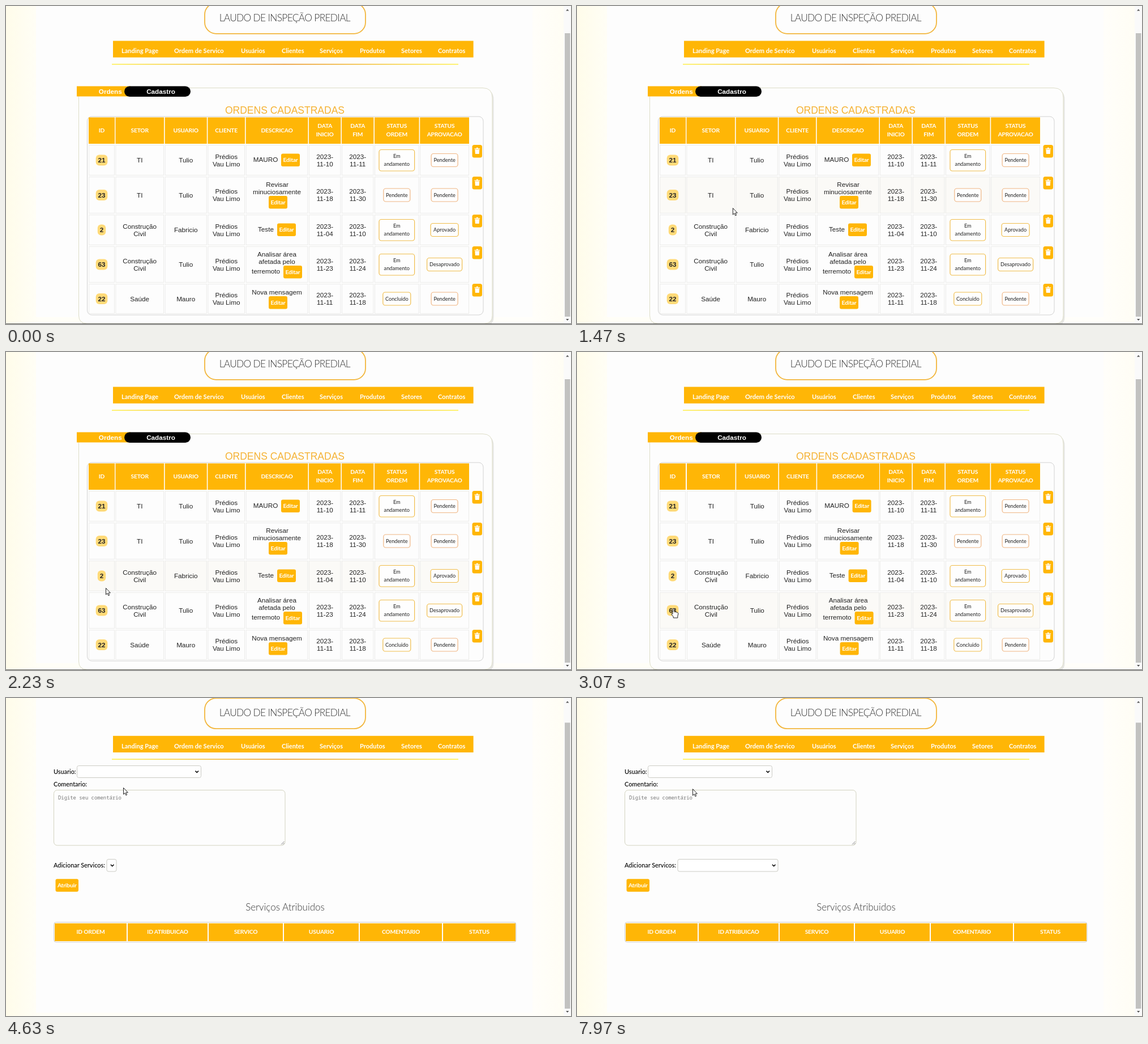
Recreate the animation shown at these times as an HTML page. Size 998 px wide and 561 px high, loop 8 s.

```html
<!DOCTYPE html>
<html lang="pt-BR">
<head>
<meta charset="utf-8">
<title>Laudo de Inspeção Predial</title>
<style>
  html, body { margin: 0; width: 100%; height: 100%; overflow: hidden; background: #fefdf6; }
  svg { display: block; width: 100vw; height: 100vh; }
  text { font: 11.7px "Liberation Sans", Arial, sans-serif; fill: #222; text-anchor: middle; }
  .start { text-anchor: start; }
  .bold { font-weight: 700; }
  .white { fill: #fff; }
  .heading { font-size: 17.5px; fill: #f5b233; }
  .thin { font: 300 17px Lato, sans-serif; fill: #333; }
  .logo { font-size: 17.3px; letter-spacing: -.65px; }
  .nav { font: 700 11px Lato, sans-serif; fill: #fff; }
  .th { font: 700 10.3px Lato, sans-serif; letter-spacing: -.2px; fill: #fff; }
  .status { font: 9.2px Lato, sans-serif; }
  .label { font: 500 10.9px Lato, sans-serif; fill: #000; }
  .hint { font: 8.9px "Noto Sans Mono", monospace; fill: #777; }
</style>
</head>
<body>
<svg viewBox="0 0 998 561" preserveAspectRatio="none">
  <defs>
    <linearGradient id="side">
      <stop offset="0" stop-color="#fffcea"/><stop offset=".06" stop-color="#fffef7"/>
      <stop offset=".93" stop-color="#fffefa"/><stop offset="1" stop-color="#fffdf3"/>
    </linearGradient>
    <linearGradient id="rule">
      <stop offset="0" stop-color="#fff04a"/><stop offset=".5" stop-color="#e8901c"/>
      <stop offset="1" stop-color="#fff04a"/>
    </linearGradient>
  </defs>
  <rect width="998" height="561" fill="url(#side)"/>
  <rect id="page" x="53" width="877" height="549" fill="#fdfdfd"/>
  <g id="orders"></g>
  <g id="detail"></g>
  <g id="header"></g>
  <g id="scrollbar"></g>
  <g id="arrow" fill="#fff" stroke="#222" stroke-width="1">
    <path d="M.5 .5V12L3.1 9.6 4.9 13.7 6.7 12.9 4.9 8.9H8.4Z"/>
  </g>
  <g id="hand" fill="#fff" stroke="#222" stroke-width="1">
    <path d="M-1 0Q.2-1.3 1.4 0V5.2L3.4 5.5 5.6 6 7.8 6.7Q9 7.1 8.8 9L7.8 13V16H.2V14L-3 9.8Q-3.8 8.2-2.4 8L-1 9.2Z"/>
  </g>
  <path id="beam" d="M-3-7.5H-1L0-6.5 1-7.5H3M0-6.5V6.5M-3 7.5H-1L0 6.5 1 7.5H3" fill="none" stroke="#444"/>
</svg>
<script>
const GOLD = '#ffb606', LOOP = 8000, SWITCH = 4030, SERVICES = 7700;
const $ = id => document.getElementById(id);
const text = (s, x, y, cls = '') => `<text x="${x}" y="${y}" class="${cls}">${s}</text>`;
const box = (x1, y1, x2, y2, fill, r = 0, stroke = 'none', w = 1) =>
  `<rect x="${x1}" y="${y1}" width="${x2 - x1}" height="${y2 - y1}" rx="${r}" fill="${fill}" stroke="${stroke}" stroke-width="${w}"/>`;
const lines = (s, x, y, gap, cls) => {
  const parts = s.split('|');
  return parts.map((p, i) => text(p, x, y + (i - (parts.length - 1) / 2) * gap, cls)).join('');
};
const button = (label, x, y, w = 33) =>
  box(x, y, x + w, y + 22.5, GOLD, 3) + text(label, x + w / 2, y + 14.5, 'th');
const chevron = (x, y) =>
  `<path d="M${x - 2.8} ${y - 1.4}l2.8 2.8 2.8-2.8" fill="none" stroke="#111" stroke-width="1.5"/>`;
const select = (x1, y1, x2, y2) =>
  box(x1, y1, x2, y2, '#fff', 3, '#cbcbc4') + chevron(x2 - 7.3, (y1 + y2) / 2);

function drawHeader() {
  const nav = [['Landing Page', 204], ['Ordem de Servico', 297], ['Usuários', 415], ['Clientes', 487],
    ['Serviços', 554], ['Produtos', 625], ['Setores', 698], ['Contratos', 763]];
  $('header').innerHTML =
    box(351, -5, 635, 48.8, '#fdfdfd', 20, '#f2b63c', 1.8) +
    text('LAUDO DE INSPEÇÃO PREDIAL', 492.3, 26.8, 'thin logo') +
    box(189, 61.5, 825.6, 90.7, GOLD) +
    nav.map(([s, x]) => text(s, x, 83.3, 'nav start')).join('') +
    box(187, 102, 799, 103.5, 'url(#rule)');
}

const columns = [[146, 192, 'ID'], [193.4, 279, 'SETOR'], [280.6, 354.8, 'USUARIO'], [356.4, 422, 'CLIENTE'],
  [423.6, 533.4, 'DESCRICAO'], [535, 591.4, 'DATA|INICIO'], [593, 649.4, 'DATA|FIM'],
  [651, 729.6, 'STATUS|ORDEM'], [731.2, 818, 'STATUS|APROVACAO']];
const rowTops = [245, 301, 368, 424, 490, 545];
const client = 'Prédios|Vau Limo';
const rows = [
  ['21', 'TI', 'Tulio', client, '2023-|11-10', '2023-|11-11', 'Em|andamento', 'Pendente'],
  ['23', 'TI', 'Tulio', client, '2023-|11-18', '2023-|11-30', 'Pendente', 'Pendente'],
  ['2', 'Construção|Civil', 'Fabricio', client, '2023-|11-04', '2023-|11-10', 'Em|andamento', 'Aprovado'],
  ['63', 'Construção|Civil', 'Tulio', client, '2023-|11-23', '2023-|11-24', 'Em|andamento', 'Desaprovado'],
  ['22', 'Saúde', 'Mauro', client, '2023-|11-11', '2023-|11-18', 'Concluido', 'Pendente']
];
// Text pieces [label, centre, baseline], then the button corner
const notes = [
  [[['MAURO', 458.5, 274.5]], 486, 260.5],
  [[['Revisar', 479, 319], ['minuciosamente', 478.5, 332]], 464, 335],
  [[['Teste', 459, 397.5]], 479, 383.5],
  [[['Analisar área', 478.5, 442], ['afetada pelo', 478.5, 455], ['terremoto', 459, 472]], 490, 458],
  [[['Nova mensagem', 478.5, 509]], 464, 512]
];
const statusHalf = { Pendente: 23.5, Aprovado: 24.5, Desaprovado: 31, Concluido: 24.5, 'Em|andamento': 31.3 };

function status(s, x, y) {
  const tall = s.includes('|'), up = tall ? 18.5 : 11.5, w = statusHalf[s];
  const edge = s === 'Pendente' ? '#efb684' : '#f0bd4c';
  return box(x - w, y - up, x + w, y + (tall ? 19 : 11.5), '#fefefe', 4, edge, 1.2) +
    lines(s, x, y + 3.2, 14.5, 'status');
}

function trash(y) {
  return box(823.5, y, 841, y + 22.5, GOLD, 3.5) +
    `<path d="M827.5 ${y + 6.2}h3l.8-1.4h2l.8 1.4h3v1.3h-9.6zM828.3 ${y + 8.3}h8l-.6 7.7h-6.8z" fill="#fff"/>`;
}

function drawOrders() {
  const groups = ['', '', ''];
  const put = (col, s) => groups[col === 0 ? 0 : col < 5 ? 1 : 2] += s;
  columns.forEach(([x1, x2, title], c) => {
    const x = (x1 + x2) / 2;
    put(c, box(x1, 196.5, x2, 243, GOLD) + lines(title, x, 222.6, 15, 'th'));
    rows.forEach((row, r) => {
      const top = rowTops[r], y = (top + rowTops[r + 1] - 2) / 2;
      put(c, box(x1 + .5, top + .5, x2 - .5, rowTops[r + 1] - 2.5, 'none', 0, '#ececea'));
      if (c === 0) {
        const w = row[0].length > 1 ? 10.3 : 7.2;
        put(c, box(x - w, y - 9.5, x + w, y + 9.5, '#ffda78', 6) + text(row[0], x, y + 4.2, 'bold'));
      } else if (c === 4) {
        const [words, bx, by] = notes[r];
        put(c, words.map(w => text(...w)).join('') + button('Editar', bx, by));
      } else {
        const s = row[c < 4 ? c : c - 1];
        put(c, c > 6 ? status(s, x, y) : lines(s, x, y + 4.2, 13.4));
      }
    });
  });
  const panel = 'M128.5 144.5H842Q859 144.5 859 162V546Q859 560 845 560H143Q128.5 560 128.5 546Z';
  $('orders').innerHTML =
    `<path d="${panel}" fill="#e6e6e3" transform="translate(2.5 3)"/>` +
    `<path d="${panel}" fill="#fdfdfd" stroke="#dedec8"/>` +
    box(125, 141.5, 220, 159.5, GOLD) + box(209, 141.5, 326, 160, '#000', 9.2) +
    text('Ordens', 184.3, 155, 'bold white') + text('Cadastro', 273.5, 155, 'bold white') +
    text('ORDENS CADASTRADAS', 492.5, 190, 'heading') +
    box(143.5, 195, 843, 545, 'none', 8, '#d2d2d2') +
    '<rect id="hover" x="146" width="672" fill="#fbfaf7"/>' +
    `<g>${groups[0]}</g><g id="shift">${groups[1]}</g><g>${groups[2]}</g>` +
    rowTops.slice(0, 5).map(trash).join('') +
    box(0, 560, 998, 561, '#666');
}

function drawDetail() {
  const heads = [[86, 213, 'ID ORDEM'], [215, 356, 'ID ATRIBUICAO'], [358, 489, 'SERVICO'],
    [491, 623, 'USUARIO'], [625, 770, 'COMENTARIO'], [772, 900, 'STATUS']];
  $('detail').innerHTML =
    text('Usuario:', 84, 133.6, 'label start') + select(125.5, 119.5, 344.5, 140.5) +
    text('Comentario:', 84, 156.3, 'label start') +
    box(84.5, 162.5, 493, 260, '#fdfdfd', 6, '#d3d3c0') +
    text('Digite seu comentário', 92, 179.2, 'hint start') +
    '<path d="M486 258.5l5.5-5.5M489 258.5l2.5-2.5" stroke="#777" stroke-width=".9"/>' +
    text('Adicionar Servicos:', 84, 299.3, 'label start') +
    `<g id="narrow">${select(178, 284.5, 195, 306)}</g>` +
    `<g id="wide">${select(178, 284.5, 355, 306)}</g>` +
    button('Atribuir', 87.5, 319.3, 40.5) +
    text('Serviços Atribuidos', 493, 374.5, 'thin') +
    box(84.5, 395.5, 901, 430.8, '#fefefe', 4, '#cfcfcf') +
    heads.map(([a, b, s]) => box(a, 397.5, b, 429, GOLD) + text(s, (a + b) / 2, 415.8, 'th')).join('');
}

function drawScrollbar() {
  $('scrollbar').innerHTML = box(985, 0, 998, 560, '#fafafa') +
    '<rect id="thumb" x="987" width="9.5" fill="#c2c2c0"/>' +
    '<path d="M989 8.5l2.7-3 2.7 3zM989 552l2.7 3 2.7-3z" fill="#555"/>';
}

const path = [[850, 470, 235], [970, 406, 275], [1470, 275, 356], [2230, 176, 416], [2900, 170, 453],
  [4030, 170, 453], [4200, 199, 346], [4630, 207, 158], [5000, 207, 127], [7550, 207, 127],
  [7930, 204, 160], [8000, 204, 160]];

function cursorAt(t) {
  const i = path.findIndex(k => k[0] > t);
  if (i < 1) return path[0].slice(1);
  const [a, b] = [path[i - 1], path[i]], p = (t - a[0]) / (b[0] - a[0]);
  return [a[1] + (b[1] - a[1]) * p, a[2] + (b[2] - a[2]) * p];
}

const show = (id, on) => $(id).setAttribute('display', on ? 'inline' : 'none');
const move = (id, x, y) => $(id).setAttribute('transform', `translate(${x} ${y})`);
const attr = (id, values) => Object.entries(values).forEach(([k, v]) => $(id).setAttribute(k, v));

function render(t) {
  const listing = t < SWITCH, [x, y] = cursorAt(t);
  const visible = t >= path[0][0], pointing = t > 2850 && listing;
  const overText = t < 1100;
  show('orders', listing);
  show('detail', !listing);
  show('narrow', t < SERVICES);
  show('wide', t >= SERVICES);
  move('header', 0, listing ? 0 : 5.3);
  attr('page', { height: listing ? 549 : 555 });
  attr('thumb', { y: listing ? 48 : 43.5, height: listing ? 500 : 504.5 });

  const row = rowTops.findIndex((top, i) => i < 5 && y >= top && y < rowTops[i + 1]);
  show('hover', listing && visible && row >= 0);
  if (row >= 0) attr('hover', { y: rowTops[row], height: rowTops[row + 1] - rowTops[row] - 2 });
  move('shift', pointing ? .6 : 0, 0);

  for (const [id, on] of [['beam', overText], ['hand', pointing], ['arrow', !overText && !pointing]]) {
    show(id, visible && on);
    move(id, x, y);
  }
}

drawHeader();
drawOrders();
drawDetail();
drawScrollbar();
const start = performance.now();
function tick() {
  render((performance.now() - start) % LOOP);
  requestAnimationFrame(tick);
}
tick();
</script>
</body>
</html>
```
